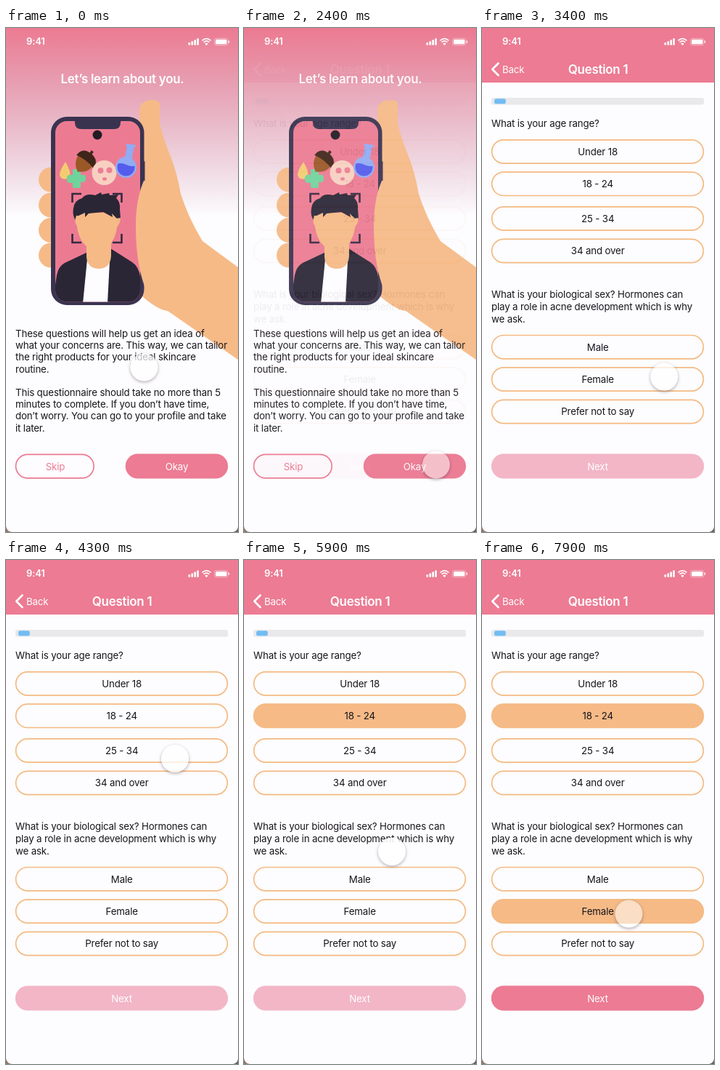
These frames come from a looping animation (320x693 px, 8000 ms). An HTML page:

```html
<!DOCTYPE html>
<html lang="en">
<head>
<meta charset="utf-8">
<title>Skincare questionnaire</title>
<style>
html, body { margin: 0; width: 100%; height: 100%; overflow: hidden; background: #fdfcfe; }
body { position: relative; }
svg { position: absolute; left: 0; top: 0; width: 320px; height: 693px; display: block; }
text { font: 400 13.3px Inter, Roboto, "Liberation Sans", sans-serif; letter-spacing: -.16px; fill: #17151a; }
text.title { font-size: 17px; font-weight: 600; letter-spacing: -.3px; fill: #fff; }
text.clock { font-size: 13px; font-weight: 600; fill: #fff; }
text.light { fill: #fff; }
text.pink { fill: #ec7b93; }
.mid { text-anchor: middle; }
#touch {
  position: absolute; left: -19px; top: -19px; width: 38px; height: 38px;
  border-radius: 50%; box-shadow: 0 1.5px 4px rgba(40, 25, 40, .36);
}
</style>
</head>
<body>
<svg viewBox="0 0 320 693">
  <defs>
    <linearGradient id="sky" x1="0" y1="0" x2="0" y2="1">
      <stop offset="0" stop-color="#ec7b92"/>
      <stop offset="1" stop-color="#be6e91" stop-opacity="0"/>
    </linearGradient>
    <clipPath id="glass"><rect x="68" y="128" width="117" height="248.500" rx="16"/></clipPath>
    <clipPath id="bulb"><circle cx="165.500" cy="191.500" r="12"/></clipPath>
  </defs>

  <g id="intro">
    <rect width="320" height="693" fill="#fdfcfe"/>
    <rect width="320" height="258" fill="url(#sky)"/>
    <text class="title mid" x="160.500" y="76">Let’s learn about you.</text>

    <g fill="#f6ba87">
      <circle cx="62" cy="208.500" r="17"/><circle cx="62" cy="243.500" r="17"/>
      <circle cx="62" cy="278" r="17"/><circle cx="62" cy="312.500" r="17"/>
      <path d="M184 125V112Q186 99 203 99Q212 99 212 105V131Q217 153 228 179Q236 200 241 228Q252 262 271 293L320 329V456L223 389Q208 388 180 362V180H184Z"/>
    </g>

    <rect x="189" y="183" width="2.500" height="29" rx="1" fill="#3a3350"/>
    <rect x="62" y="122" width="128.500" height="259" rx="22" fill="#3a3350"/>
    <g clip-path="url(#glass)">
      <rect x="68" y="128" width="117" height="249" fill="#ec7b92"/>
      <path d="M92 126H161Q158 127 158 130Q158 139 149 139H104Q95 139 95 130Q95 127 92 126Z" fill="#3a3350"/>
      <path d="M112 311L146 304L142 377H106Z" fill="#fdfcfe"/>
      <path d="M113 308L81 323Q72 328 70 340L64 378H106Z" fill="#2a2636"/>
      <path d="M144 303L174 322Q183 328 185 342L189 378H140Z" fill="#2a2636"/>
      <path d="M111 285H145V309Q146 331 127 331Q110 330 111 310Z" fill="#f6ba87"/>
      <path d="M97 254V264Q99 297 118 304Q126 306 134 304Q152 297 154 266V254Z" fill="#f6ba87"/>
      <path d="M97 266Q91 258 93 248Q94 237 105 234Q110 227 123 230L131 226L132 229L142 227L143 230L155 229L152 234Q158 239 157 249L158 262L153 268V262L146 255L147 260L134 253L114 255L109 260V254L98 259Z" fill="#2a2636"/>
      <path d="M97 258Q93 268 99 273V258ZM152 262L158 261Q157 271 152 274Z" fill="#f6ba87"/>
    </g>
    <path d="M91.500 240V228H104M147 228H159.500V240M159.500 283V295H147M104 295H91.500V283" fill="none" stroke="#352a40" stroke-width="2.600"/>
    <circle cx="126" cy="147" r="6.500" fill="#211c24"/>

    <path d="M82 184Q90 198 88 203A7.300 7.300 0 0 1 74 202Q74 196 82 184Z" fill="#f3cc72"/>
    <path d="M94 194H101Q103 194 103 197V202H107Q110 202 110 205V208Q110 212 106 212H103V218Q103 220 100 220H94Q92 220 92 217V213H88Q84 213 84 209V206Q84 202 88 202H92V197Q92 194 94 194Z" fill="#70d39c"/>
    <g transform="rotate(38 109 184)">
      <path d="M96 181H121Q122 194 109 201Q96 194 96 181Z" fill="#9b5827"/>
      <path d="M94 184Q94 170 108 170Q123 170 124 184Q109 180 94 184Z" fill="#40251a"/>
      <path d="M107 172L106 166H110V172Z" fill="#40251a"/>
    </g>
    <circle cx="135.500" cy="199" r="17" fill="#f8d0c1"/>
    <g fill="#ec7f95">
      <circle cx="130.500" cy="196" r="4"/><circle cx="142.500" cy="195.500" r="4"/>
      <ellipse cx="136" cy="207.500" rx="3" ry="2.300"/>
    </g>
    <g fill="#91abf4">
      <path d="M166 159L179 161L178.500 164L176.500 164L173 184L163 182L167 163L165.500 162Z"/>
      <circle cx="165.500" cy="191.500" r="14.500"/>
    </g>
    <path d="M150 188Q158 184 166 188T182 188V207H150Z" fill="#535cec" clip-path="url(#bulb)"/>

    <path d="M190 210Q179 235 179 272Q179 320 190 352Q199 377 219 388L230 380V210Z" fill="#f6ba87"/>
    <g id="copy"></g>
    <rect x="13.500" y="586.300" width="107.700" height="32.500" rx="16.250" fill="#fdfcfe" stroke="#ec7b93" stroke-width="1.700"/>
    <text class="mid pink" x="68" y="607.500">Skip</text>
    <rect x="164.700" y="585.500" width="141.500" height="34" rx="17" fill="#ec7b93"/>
    <text class="mid light" x="235.500" y="607.500">Okay</text>
  </g>

  <g id="quiz">
    <rect width="320" height="693" fill="#fdfcfe"/>
    <rect width="320" height="75" fill="#ec7b93"/>
    <path d="M22.500 48.500L14.300 56.800L22.500 65" fill="none" stroke="#fff" stroke-width="2.700" stroke-linecap="round" stroke-linejoin="round"/>
    <text class="light" x="28" y="61.500">Back</text>
    <text class="title mid" x="160" y="63">Question 1</text>
    <rect x="13" y="96" width="293" height="9.500" rx="2.500" fill="#e9e8eb"/>
    <rect x="17" y="97.300" width="15.800" height="7" rx="2.500" fill="#72bcf2"/>
    <g id="form"></g>
    <rect x="12.800" y="585.500" width="293.400" height="34" rx="17" fill="#f2b6c7"/>
    <rect id="next" x="12.800" y="585.500" width="293.400" height="34" rx="17" fill="#ec7b93"/>
    <text class="mid light" x="159.500" y="607.500">Next</text>
  </g>

  <text class="clock" x="28" y="23">9:41</text>
  <g fill="#fff">
    <rect x="251.500" y="20" width="2.600" height="3.500" rx=".6"/>
    <rect x="255.500" y="18.300" width="2.600" height="5.200" rx=".6"/>
    <rect x="259.400" y="16.300" width="2.600" height="7.200" rx=".6"/>
    <rect x="263.300" y="14.300" width="2.600" height="9.200" rx=".6"/>
    <path d="M276.500 24L274.300 21.500Q276.500 19.700 278.700 21.500Z"/>
    <rect x="289" y="15.800" width="15.500" height="6.400" rx="1.500"/>
    <rect x="306.800" y="17.300" width="1.300" height="3.400" rx=".6"/>
  </g>
  <g fill="none" stroke="#fff">
    <path d="M270.500 17.300Q276.500 12 282.500 17.300M272.600 19.600Q276.500 16.200 280.400 19.600" stroke-width="1.700"/>
    <rect x="287.500" y="14.300" width="18.500" height="9.400" rx="2.600" stroke-width=".8" stroke-opacity=".5"/>
  </g>
  <path d="M0 685Q1 692 8 693H0Z" fill="#8d7a6c"/>
  <path d="M320 686Q319 692 313 693H320Z" fill="#6b6062"/>
</svg>
<div id="touch"></div>

<script>
const $ = id => document.getElementById(id);
const LOOP = 8000;

const copy = [
  "These questions will help us get an idea of",
  "what your concerns are. This way, we can tailor",
  "the right products for your ideal skincare",
  "routine.",
  "",
  "This questionnaire should take no more than 5",
  "minutes to complete. If you don’t have time,",
  "don’t worry. You can go to your profile and take",
  "it later."
];
const prompts = [
  [135.7, "What is your age range?"],
  [370.5, "What is your biological sex? Hormones can"],
  [387.5, "play a role in acne development which is why"],
  [404.5, "we ask."]
];
const options = [
  [170, "Under 18"], [214.3, "18 - 24"], [262, "25 - 34"], [306.5, "34 and over"],
  [438.7, "Male"], [483, "Female"], [527.5, "Prefer not to say"]
];

const line = (y, s) => `<text x="13" y="${y}">${s}</text>`;
const option = ([y, s]) =>
  `<rect x="13.600" y="${y - 16.2}" width="291.800" height="32.400" rx="16.200"
    fill="#f6ba87" fill-opacity="0" stroke="#f4ba82" stroke-width="1.700"/>
  <text class="mid" x="159.700" y="${y + 4.8}">${s}</text>`;

$("copy").innerHTML = copy.map((s, i) => line(425 + i * 16.2, s)).join("");
$("form").innerHTML = prompts.map(p => line(...p)).join("") + options.map(option).join("");
const pills = $("form").querySelectorAll("rect");

const smooth = p => p * p * (3 - 2 * p);
const out = p => 1 - (1 - p) ** 3;
const part = (t, a, b) => Math.min(1, Math.max(0, (t - a) / (b - a)));
const fade = (t, a, b) => smooth(part(t, a, b));

// start, end, x, y, easing
const moves = [
  [100, 1200, 265, 600.5, smooth],
  [2900, 3600, 248, 450, smooth],
  [3970, 4800, 229, 224, out],
  [5400, 6100, 203.5, 405, out],
  [6400, 7100, 202.5, 486.5, smooth]
];
// start, end, opacity
const presses = [
  [1100, 1400, .5], [2900, 3300, .74], [4750, 5000, .5],
  [5400, 5700, .88], [7100, 7400, .52]
];

function draw(t) {
  let x = 190.5, y = 466.5, alpha = .72;
  for (const [a, b, tx, ty, ease] of moves) {
    const p = ease(part(t, a, b));
    x += (tx - x) * p;
    y += (ty - y) * p;
  }
  for (const [a, b, to] of presses) alpha += (to - alpha) * part(t, a, b);
  $("touch").style.transform = `translate(${x}px, ${y}px)`;
  $("touch").style.background = `rgba(255, 255, 255, ${alpha})`;

  $("quiz").style.opacity = fade(t, 2365, 2600);
  pills[1].style.fillOpacity = fade(t, 5050, 5300);
  const answered = fade(t, 7450, 7700);
  pills[5].style.fillOpacity = answered;
  $("next").style.opacity = answered;
}

const start = performance.now();
function tick() {
  draw((performance.now() - start) % LOOP);
  requestAnimationFrame(tick);
}
tick();
</script>
</body>
</html>
```
